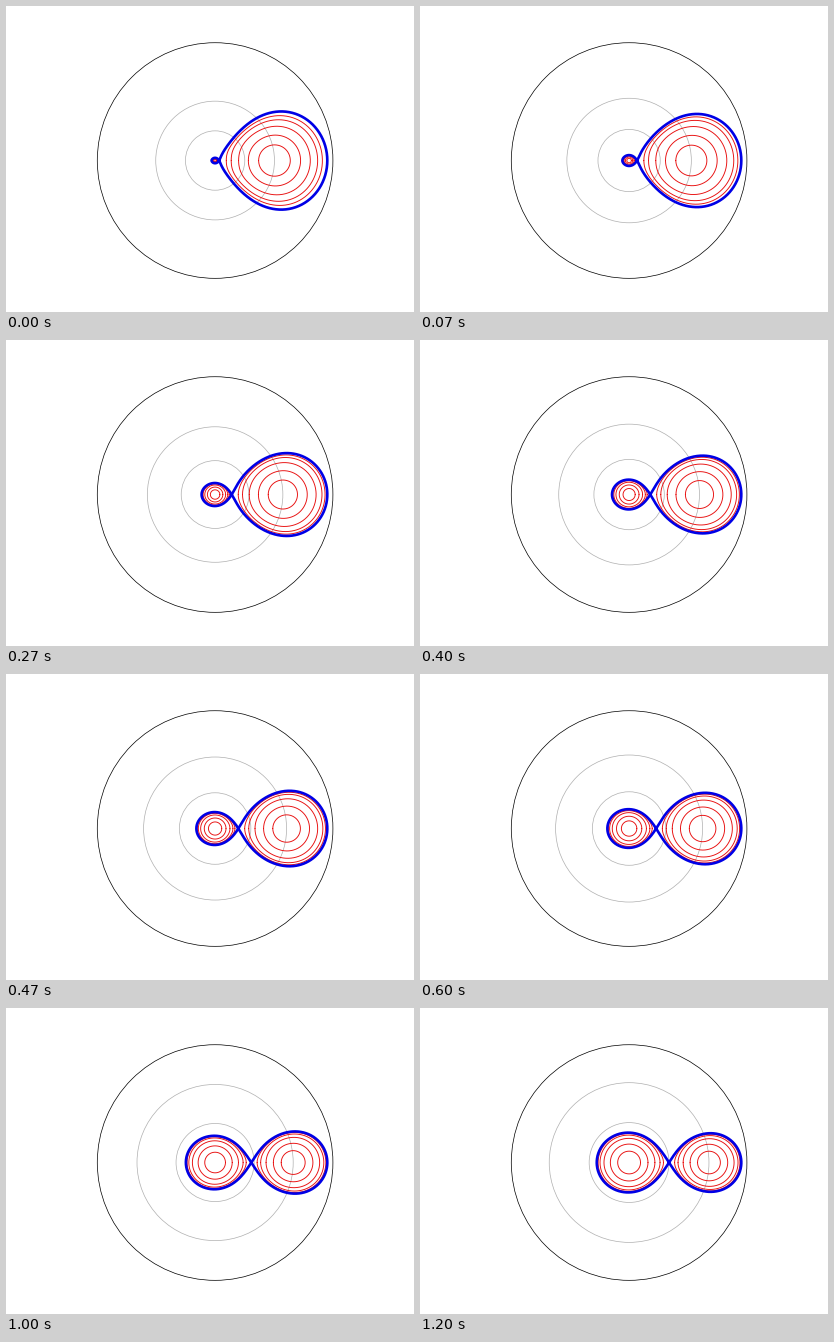
Recreate the animation shown at these times as a matplotlib script. Size 408 by 306 pixels, loop 1270 ms.

```python
import numpy as np
import matplotlib.pyplot as plt
from matplotlib.animation import FuncAnimation

W, H, DPI = 408, 306, 63.75
POSES, FPS = 19, 15
LOOP_MS, TICK_MS = 1270, 10
CX, CY = 0.5125 * W, 0.495 * H
RADIUS = 0.385 * H
MARGIN = 1.05
INNER, RATIO, N_LEVELS = 0.286, 0.375, 5

theta = np.linspace(0, 2 * np.pi, 361)


def bisect(f, lo, hi, steps=40):
    """Root of f, which is positive above it, elementwise."""
    for _ in range(steps):
        mid = (lo + hi) / 2
        above = f(mid) > 0
        lo, hi = np.where(above, lo, mid), np.where(above, mid, hi)
    return (lo + hi) / 2


def potential(r, angle, m):
    """Roche potential around a star of mass m, angle 0 facing the companion."""
    other = 1 - m
    x, y = r * np.cos(angle), r * np.sin(angle)
    return m / r + other / np.hypot(1 - x, y) + ((x - other) ** 2 + y ** 2) / 2


def inner_point(m):
    """Distance from the star of mass m to L1."""
    return float(bisect(
        lambda s: -m / s ** 2 + (1 - m) / (1 - s) ** 2 + s - (1 - m),
        1e-4, 1 - 1e-4))


def shells(m):
    """Radii over theta: the inner shells first, the Roche lobe last."""
    s = inner_point(m)
    rim = potential(s, 0, m)
    excess = potential(INNER * s, 0, m) - rim
    levels = [rim + excess * RATIO ** k for k in range(N_LEVELS)] + [rim]
    lo, hi = np.full(theta.shape, 1e-6), np.full(theta.shape, s)
    return [bisect(lambda r: level - potential(r, theta, m), lo, hi)
            for level in levels]


def around_small(r):
    return r * np.cos(theta), r * np.sin(theta)


def around_large(r):
    """Shell of the large star, bent by using y / R as the polar angle."""
    x, y = 1 - r * np.cos(theta), r * np.sin(theta)
    dist = np.hypot(x, y)
    return dist * np.cos(y / dist), dist * np.sin(y / dist)


def make_pose(i):
    """Separation in pixels and all curves in units of the separation."""
    root = np.sqrt(0.001)
    q = (root + (1 - root) * i / (POSES - 1)) ** 2
    mass = q / (1 + q)
    large = shells(1 - mass)
    back = large[-1][len(theta) // 2]
    curves = [around_small(r) for r in shells(mass)]
    curves += [around_large(r) for r in large]
    return RADIUS / (MARGIN * (1 + back)), curves


fig = plt.figure(figsize=(W / DPI, H / DPI), dpi=DPI, facecolor="white")
ax = fig.add_axes([0, 0, 1, 1])
ax.set(xlim=(0, W), ylim=(0, H))
ax.axis("off")


def ring(radius, color, z):
    circle = plt.Circle((CX, CY), radius, fill=False, ec=color, lw=0.8, zorder=z)
    return ax.add_patch(circle)


def curve(color, width, z):
    return ax.plot([], [], color=color, lw=width, zorder=z,
                   solid_capstyle="round")[0]


def star_lines():
    inner = [curve("#e81010", 1.05, 2) for _ in range(N_LEVELS)]
    return inner + [curve("#0000e6", 3, 3)]


ring(RADIUS, "black", 4)
grid = [ring(1, "#b0b0b0", 1) for _ in range(2)]
lines = star_lines() + star_lines()
poses = [make_pose(i) for i in range(POSES)]


def draw(tick):
    # Pose starts are rounded to whole ticks.
    i = int((tick + 0.5) * TICK_MS * FPS / 1000)
    a, curves = poses[i]
    for circle, share in zip(grid, (0.5, 1)):
        circle.set_radius(a * share)
    for line, (x, y) in zip(lines, curves):
        line.set_data(CX + a * x, CY + a * y)
    return grid + lines


anim = FuncAnimation(fig, draw, frames=LOOP_MS // TICK_MS, interval=TICK_MS,
                     repeat=True, repeat_delay=0)
plt.show()
```
